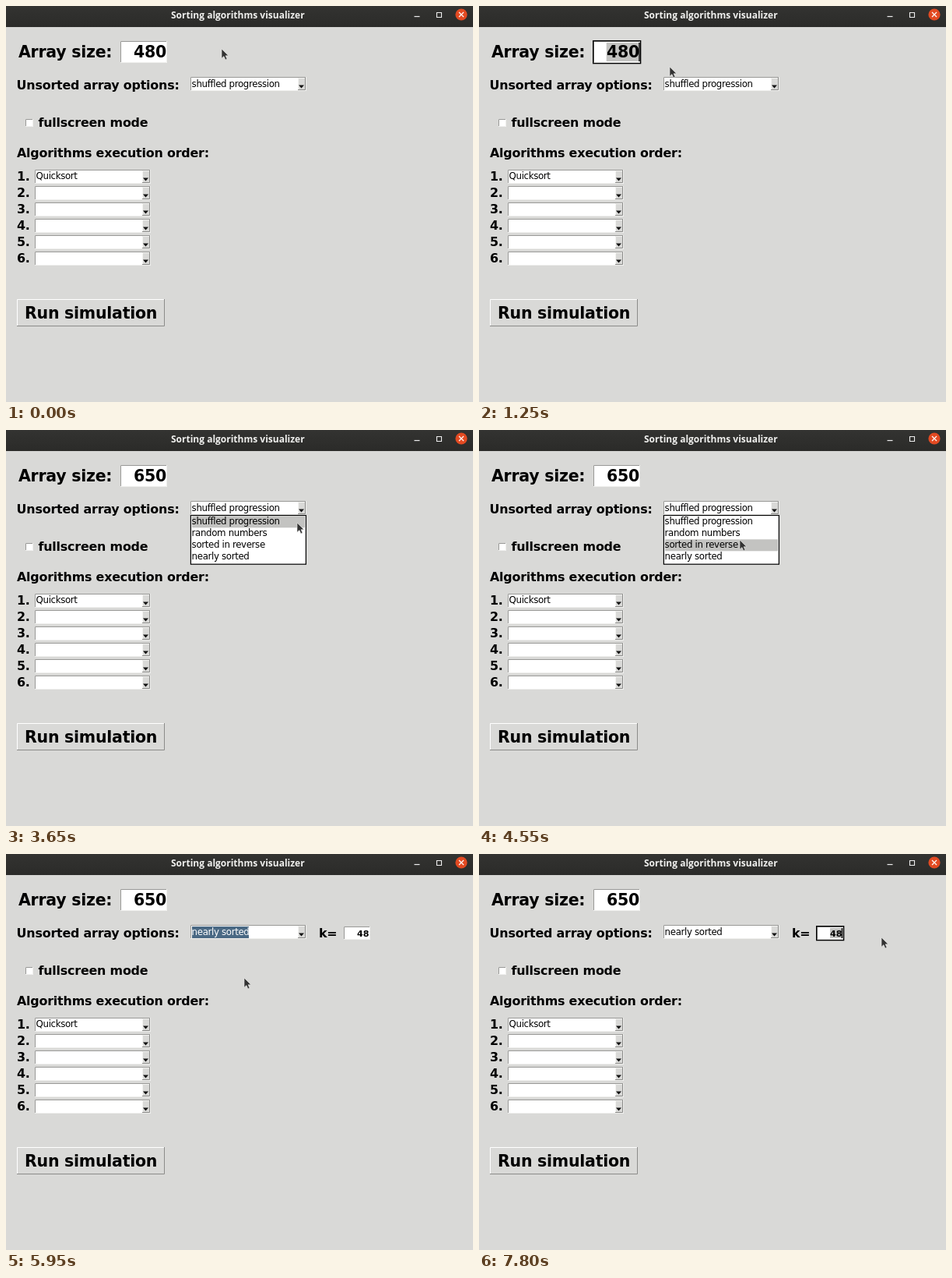
Animation of 600x508 px, one loop 8000 ms. Source, as an HTML page:

```html
<!DOCTYPE html>
<html lang="en">
<head>
<meta charset="utf-8">
<title>Sorting algorithms visualizer</title>
<style>
html, body { margin: 0; width: 100%; height: 100%; overflow: hidden; background: #d9d9d7; }
svg { display: block; width: 600px; height: 508px; }
text { font: 11.8px "DejaVu Sans", sans-serif; letter-spacing: -.35px; white-space: pre; }
.small { font-weight: bold; font-size: 11.1px; letter-spacing: 0; }
.mid { font-weight: bold; font-size: 15.9px; letter-spacing: -.2px; }
.big { font-weight: bold; font-size: 20.5px; letter-spacing: -.25px; }
.title { font: bold 12px "Open Sans", sans-serif; letter-spacing: 0; fill: #f0f0ee; }
.end { text-anchor: end; }
</style>
</head>
<body>
<svg id="stage" viewBox="0 0 600 508">
  <defs>
    <linearGradient id="bar" x1="0" y1="0" x2="0" y2="1">
      <stop offset="0" stop-color="#333331"/>
      <stop offset="1" stop-color="#2b2b29"/>
    </linearGradient>
  </defs>
</svg>
<script>
const LOOP = 8000, STEP = 50;
const stage = document.getElementById('stage');

function add(tag, attrs, parent = stage) {
  const el = document.createElementNS('http://www.w3.org/2000/svg', tag);
  for (const key in attrs) el.setAttribute(key, attrs[key]);
  parent.appendChild(el);
  return el;
}
const group = () => add('g', {});
const rect = (x, y, width, height, fill, parent) => add('rect', { x, y, width, height, fill }, parent);
const path = (d, attrs, parent) => add('path', { d, fill: 'none', ...attrs }, parent);
const show = (el, on) => el.setAttribute('visibility', on ? 'inherit' : 'hidden');
const clamp = (v, lo, hi) => Math.max(lo, Math.min(hi, v));

function label(x, y, str, cls = '', parent) {
  const el = add('text', { x, y, class: cls }, parent);
  el.textContent = str;
  return el;
}
function relief(x, y, w, h, fill, light, dark, parent) {
  rect(x, y, w, h, fill, parent);
  path(`M${x + .5} ${y + h}V${y + .5}H${x + w}`, { stroke: light }, parent);
  path(`M${x + w - .5} ${y}V${y + h - .5}H${x}`, { stroke: dark }, parent);
}
const sunken = (x, y, w, h, parent) => relief(x, y, w, h, '#fff', '#999997', '#efefed', parent);
function combo(x, y) {
  sunken(x, y, 149, 18);
  relief(x + 138, y + 1, 10, 16, '#d9d9d7', '#f4f4f2', '#8b8b89');
  path(`M${x + 139} ${y + 10.5}h7l-3.5 4z`, { fill: '#111' });
}

// window frame
rect(0, 0, 600, 508, '#d9d9d7');
rect(0, 0, 600, 27, 'url(#bar)');
label(212, 16, 'Sorting algorithms visualizer', 'title');
path('M524.5 13.5h7', { stroke: '#eee', 'stroke-width': 1.2 });
path('M553.5 8.5h6v6h-6z', { stroke: '#eee', 'stroke-width': 1.1 });
add('circle', { cx: 585, cy: 11, r: 7.6, fill: '#e24a22' });
path('M582 8l6 6m0-6l-6 6', { stroke: '#fff', 'stroke-width': 1.2 });

// fixed labels and controls
label(16, 65.5, 'Array size:', 'big');
label(13.6, 107, 'Unsorted array options:', 'mid');
sunken(25, 145, 10, 10);
label(41.5, 155, 'fullscreen mode', 'mid');
label(14, 194, 'Algorithms execution order:', 'mid');
for (let i = 0; i < 6; i++) {
  label(14, 224 + 21 * i, i + 1 + '.', 'mid');
  combo(37, 210 + 21 * i);
}
label(38.6, 222, 'Quicksort');
relief(14, 376, 190, 35, '#d9d9d7', '#fff', '#8b8b89');
label(24, 401, 'Run simulation', 'big');
combo(237, 91);
const mark = rect(239, 93, 73, 15, '#4a6984');
const choice = label(238.6, 104, '');

// number entry with focus ring, selection and caret
function entry(x, y, w, h, right, base, digit, cls, parent) {
  sunken(x, y, w, h, parent);
  const ring = add('rect', { x: x - .3, y: y - .3, width: w + .9, height: h + .9,
    fill: 'none', stroke: '#000', 'stroke-width': 1.4 }, parent);
  const sel = rect(0, y + 2, 0, h - 4, '#c3c3c1', parent);
  const text = label(right, base, '', cls + ' end', parent);
  const caret = rect(0, y + 2, 1.4, h - 4, '#000', parent);
  return (value, focus, selecting, mouseX) => {
    const left = right - digit * value.length;
    const n = selecting ? clamp(Math.round((mouseX - left) / digit), 0, value.length) : value.length;
    text.textContent = value;
    show(ring, focus);
    show(sel, focus && selecting);
    sel.setAttribute('x', left);
    sel.setAttribute('width', digit * n);
    show(caret, focus);
    caret.setAttribute('x', left + digit * n - .7);
  };
}
const setSize = entry(147, 45, 60, 28, 206, 66, 14.1, 'big');
const kBox = group();
label(402, 107, 'k=', 'mid', kBox);
const setK = entry(434, 93, 34, 17, 466.5, 105.5, 7.72, 'small', kBox);

// drop-down list
const menu = group();
add('rect', { x: 237.4, y: 109.5, width: 148, height: 62.7, fill: '#fff', stroke: '#000', 'stroke-width': 1.2 }, menu);
const band = rect(239, 0, 145, 15, '#c3c3c1', menu);
['shuffled progression', 'random numbers', 'sorted in reverse', 'nearly sorted']
  .forEach((s, i) => label(238.6, 121.3 + 15 * i, s, '', menu));

const pointer = path('M0 0V12.2L2.9 9.6L4.9 14L7 13L5.1 8.8H8.8Z',
  { fill: '#333', stroke: '#f0f0ee', 'stroke-width': .6 });

// pointer moves: start, end, x, y
const moves = [
  [0, 50, 277, 55],
  [50, 850, 158, 57],      // to the size entry
  [950, 1250, 245, 78],    // drag across the number
  [2100, 2600, 317, 139],
  [2750, 3200, 379, 101],  // to the list button
  [3350, 3650, 374, 119],
  [3750, 4150, 322, 128],
  [4200, 4550, 335, 141],
  [4600, 5650, 306, 159],  // to the last option
  [6000, 6400, 442, 102],  // to the k entry
  [6400, 6750, 499, 104],  // drag across the number
  [6800, 7600, 517, 107]
];

function place(t) {
  let [, , x, y] = moves[0];
  for (const [from, to, nx, ny] of moves) {
    const f = clamp((t - from) / (to - from), 0, 1);
    const ease = f * f * (3 - 2 * f);
    x += (nx - x) * ease;
    y += (ny - y) * ease;
  }
  return [Math.round(x), Math.round(y)];
}

function draw(now) {
  const t = Math.floor(now % LOOP / STEP) * STEP;
  const [x, y] = place(t);
  pointer.setAttribute('transform', `translate(${x} ${y})`);

  const typed = Math.floor((t - 1300) / 200);
  const size = typed > 0 ? '650'.slice(0, typed) : '480';
  setSize(size, t >= 850 && t < 3350, typed < 1, x);

  const chosen = t >= 5950, inK = t >= 6400;
  show(menu, t >= 3350 && !chosen);
  band.setAttribute('y', 110.3 + 15 * clamp(Math.floor((y - 110) / 15), 0, 3));

  choice.textContent = chosen ? 'nearly sorted' : 'shuffled progression';
  choice.style.fill = chosen && !inK ? '#fff' : '#000';
  show(mark, chosen && !inK);
  show(kBox, chosen);
  setK('48', inK, true, x);
}

const start = performance.now();
function tick() {
  draw(performance.now() - start);
  requestAnimationFrame(tick);
}
draw(0);
requestAnimationFrame(tick);
</script>
</body>
</html>
```
